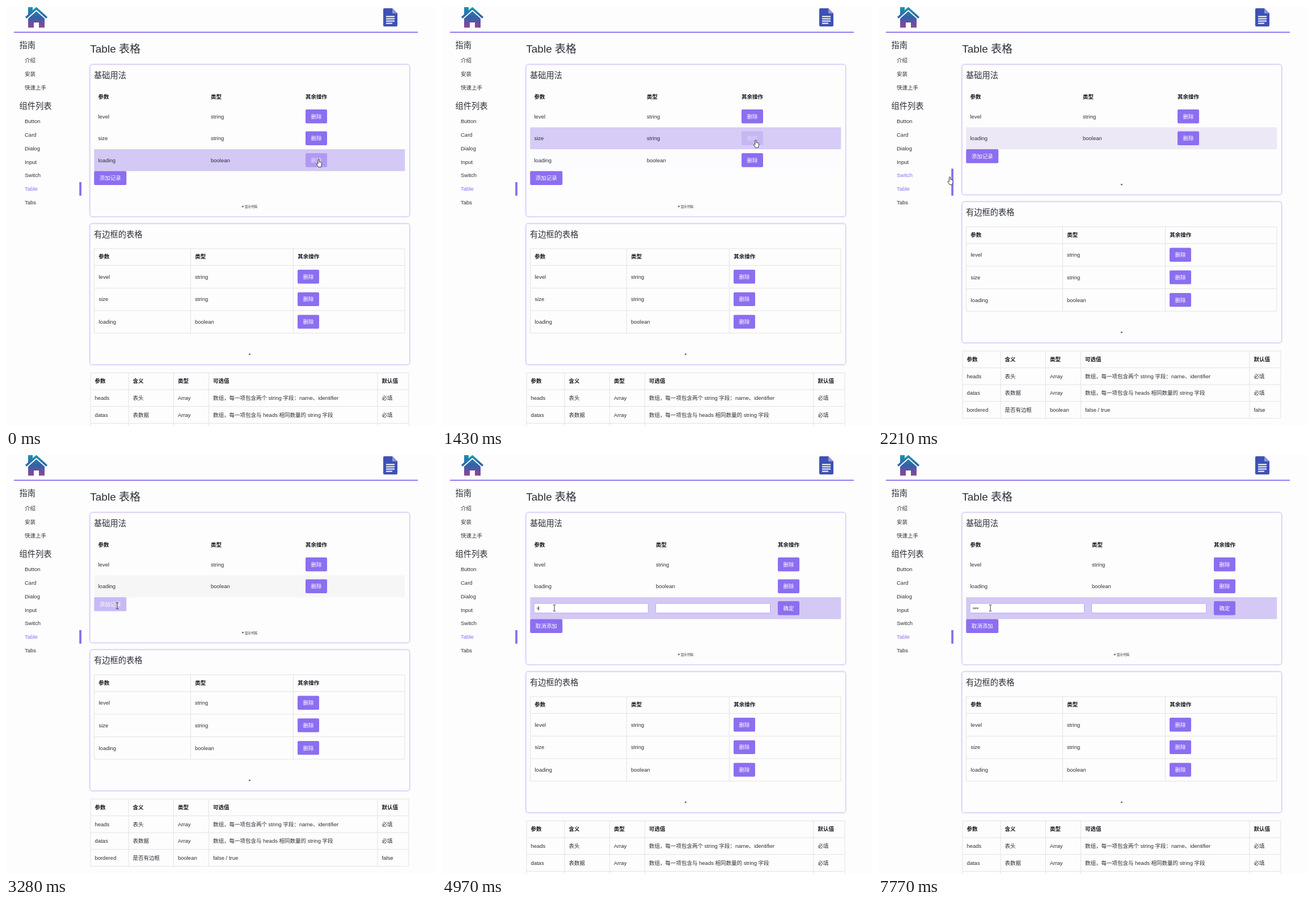
An HTML page that plays this animation: 758x739 px, repeating every 8000 ms.

```html
<!DOCTYPE html>
<html lang="zh-CN">
<head>
<meta charset="utf-8">
<style>
  html, body { margin: 0; width: 100%; height: 100%; overflow: hidden; background: #fdfdfd; }
  svg { display: block; font-family: "Liberation Sans", "Noto Sans CJK SC", "Noto Sans CJK", sans-serif; }
  text { white-space: pre; }
  .card { fill: #fdfdfd; filter: drop-shadow(0 0 1.6px #8c6ef0); }
</style>
</head>
<body>
<svg id="stage" width="758" height="739" viewBox="0 0 758 739"></svg>
<script>
const PURPLE = '#8c6ef0', INK = '#2c3038', HOVER = '#d4c8f5', GRID = '#e3e3e6';
const LOOP = 8000, BASE = 9.5, ROW = 38.5;

// Each step overrides part of the state from its time on.
const steps = [
  [0, { rows: ['level', 'size', 'loading'], shade: ['', '', HOVER], press: [2, .5], cursor: ['hand', 547, 269],
        adding: false, addAlpha: 1, code: true, menu: false, typed: '', caret: null }],
  [500, { cursor: ['hand', 548, 270] }],
  [930, { cursor: ['hand', 549, 247], shade: ['', '#f7f6fb', '#d6ccf7'], press: [1, .8] }],
  [1050, { cursor: ['hand', 549, 242], shade: ['', '#eae8f5', '#dfd9f9'], press: [1, .6] }],
  [1170, { shade: ['', '#ddd6f6', '#eeebfb'], press: [1, .5] }],
  [1290, { shade: ['', '#d6ccf6', '#fcfbfe'] }],
  [1430, { cursor: ['hand', 549, 235], press: [1, .22] }],
  [1550, { rows: ['level', 'loading'], shade: ['', HOVER], press: [-1, 1] }],
  [2060, { cursor: ['arrow', 486, 244] }],
  [2210, { cursor: ['hand', 122.5, 300], shade: ['', '#ece8f6'], code: false, menu: true }],
  [2360, { cursor: ['hand', 127, 300] }],
  [2500, { cursor: ['arrow', 489, 300], code: true, menu: false }],
  [2620, { cursor: ['arrow', 356, 311] }],
  [2760, { cursor: ['arrow', 332, 283] }],
  [2900, { cursor: ['arrow', 216, 283] }],
  [3040, { cursor: ['hand', 195, 264], shade: ['', '#f6f6f6'], addAlpha: .7 }],
  [3160, { addAlpha: .6 }],
  [3280, { cursor: ['beam', 193.5, 261], addAlpha: .47 }],
  [3400, { cursor: ['beam', 195.5, 265], adding: true, addAlpha: 1, shade: ['', '', '#e6e0f8'], caret: 167 }],
  [3520, { shade: ['', '', HOVER] }],
  [3920, { caret: null }],
  [4430, { caret: 167 }],
  [4970, { typed: 's', caret: 170 }],
  [5090, { typed: 'si', caret: 171 }],
  [5630, { caret: null }],
  [6200, { caret: 171 }],
  [6350, { typed: 'siz', caret: 174 }],
  [6730, { typed: 'size', caret: 177 }],
  [7240, { caret: 382 }],
  [7770, { caret: null }]
];
const types = { level: 'string', size: 'string', loading: 'boolean' };

const rect = (x, y, w, h, fill, attrs = '') =>
  `<rect x="${x}" y="${y}" width="${w}" height="${h}" fill="${fill}" ${attrs}/>`;
const path = (d, fill, attrs = '') => `<path d="${d}" fill="${fill}" ${attrs}/>`;
// y is the optical middle of the line
const text = (x, y, s, size = BASE, fill = INK, weight = 400) =>
  `<text x="${x}" y="${y + size * .36}" font-size="${size}" fill="${fill}" font-weight="${weight}">${s}</text>`;
const bold = (x, y, s) => text(x, y, s, BASE, '#15181f', 700);
const button = (x, y, label, alpha = 1) =>
  `<g opacity="${alpha}">${rect(x, y - 12.2, label.length * BASE + 19, 24.4, PURPLE, 'rx="2"')}${text(x + 9.5, y, label, BASE, '#fff')}</g>`;
const card = (y, h, title) =>
  `<rect class="card" x="148.5" y="${y}" width="562.5" height="${h}" rx="4"/>${text(155, y + 18, title, 14.25)}`;
const triangle = (x, y) => path(`M${x - 2} ${y - 1.3}h4l-2 2.8z`, '#444');

function grid(xs, ys) {
  const [left, right, top, bottom] = [xs[0], xs.at(-1), ys[0], ys.at(-1)];
  const d = xs.map(x => `M${x} ${top}V${bottom}`).join('') + ys.map(y => `M${left} ${y}H${right}`).join('');
  return path(d, 'none', `stroke="${GRID}"`);
}

function cursor([kind, x, y]) {
  const shape = {
    hand: path('M3 8.5V1.7a1.1 1.1 0 0 1 2.2 0V5.2l3 .7q1.3.4 1.3 1.8v2.8L8.3 14.4H3.8L.9 10q-.8-1.7.5-2Z',
      '#fff', 'stroke="#222" stroke-width=".9" stroke-linejoin="round"'),
    arrow: path('M.4.5V10l2.1-1.9 1.4 3.4 1.4-.6L3.9 7.6h2.9Z', '#fff', 'stroke="#222" stroke-width=".7"'),
    beam: path('M.3.5H2l.6.5.6-.5h1.7M2.6.8v10.4M.3 11.5H2l.6-.5.6.5h1.7', 'none', 'stroke="#222" stroke-width=".9"')
  };
  return `<g transform="translate(${x} ${y})">${shape[kind]}</g>`;
}

function header() {
  return `<defs><linearGradient id="house" gradientUnits="userSpaceOnUse" x1="0" y1="1" x2="0" y2="38">
      <stop offset="0" stop-color="#1697b4"/><stop offset=".5" stop-color="#3162a6"/><stop offset="1" stop-color="#92439b"/>
    </linearGradient></defs>` +
    path('M39 2h8v5.5l6.5-5.7L73 19.2 70.7 22 53.5 6.8 36.3 22 34 19.2l5-4.4Z', 'url(#house)') +
    path('M39 22 53.5 9.3 68 22V38H58V29H49V38H39Z', 'url(#house)') +
    path('M667 4h14l9 9v21q0 2-2 2h-21q-2 0-2-2V6q0-2 2-2Z', '#3f51b5') +
    path('M681 4l9 9h-9Z', '#8d98d6') +
    path('M670 18.5h15M670 22.5h15M670 26.5h15M670 30.5h11', 'none', 'stroke="#fff" stroke-width="1.8"') +
    rect(14, 45.3, 712, 1.9, PURPLE);
}

function sidebar(s) {
  const guide = ['介绍', '安装', '快速上手'];
  const parts = ['Button', 'Card', 'Dialog', 'Input', 'Switch', 'Table', 'Tabs'];
  const active = name => name === 'Table' || (s.menu && name === 'Switch');
  return text(23.5, 69, '指南', 14.25) + guide.map((g, i) => text(33, 96 + i * 23.8, g)).join('') +
    text(23.5, 175.5, '组件列表', 14.25) +
    parts.map((p, i) => {
      const y = 203 + i * 23.75;
      return text(33, y, p, BASE, active(p) ? PURPLE : INK) +
        (active(p) ? rect(129.2, y - 11.8, 3.8, 23.8, PURPLE) : '');
    }).join('');
}

function basicCard(s, shift) {
  const [typeX, actionX] = s.adding ? [377, 592] : [361, 528];
  const labelY = 353 - shift;
  let out = card(103.5, 266.5 - shift, '基础用法') +
    bold(162.5, 160, '参数') + bold(typeX, 160, '类型') + bold(actionX, 160, '其余操作');
  s.shade.forEach((c, i) => { if (c) out += rect(155.3, 175 + i * ROW, 548, ROW, c); });
  s.rows.forEach((name, i) => {
    const y = 194.2 + i * ROW;
    out += text(162.5, y, name) + text(typeX, y, types[name]) +
      button(actionX, y, '删除', s.press[0] === i ? s.press[1] : 1);
  });
  if (s.adding) {
    const field = 'rx="2" stroke="#b5a3f4" stroke-width=".9"';
    out += rect(162, 263, 201.5, 16.8, '#fff', field) + rect(376.7, 263, 202, 16.8, '#fff', field) +
      text(167, 271.4, s.typed, 5.7, '#111') + button(592, 271.2, '确定');
    if (s.caret) out += rect(s.caret, 268, 1, 7, '#222');
  }
  out += button(155.3, 302.8 - shift, s.adding ? '取消添加' : '添加记录', s.addAlpha);
  return out + (s.code
    ? triangle(417.5, labelY) + text(420.7, labelY, '显示代码', 5.6, '#222')
    : triangle(429.5, labelY));
}

function borderedCard() {
  const xs = [155.5, 325.5, 506.5, 703];
  return card(383.5, 247, '有边框的表格') + grid(xs, [427, 456.5, 496.3, 536, 575.5]) +
    ['参数', '类型', '其余操作'].map((h, i) => bold(xs[i] + 7.8, 441, h)).join('') +
    Object.keys(types).map((name, i) => {
      const y = 476.2 + i * 39.7;
      return text(163.5, y, name) + text(333, y, types[name]) + button(514, y, '删除');
    }).join('') + triangle(429.5, 613);
}

function apiTable() {
  const xs = [149, 216, 295.5, 357.5, 655, 710];
  const lines = [
    ['参数', '含义', '类型', '可选值', '默认值'],
    ['heads', '表头', 'Array', '数组，每一项包含两个 string 字段：name、identifier', '必填'],
    ['datas', '表数据', 'Array', '数组，每一项包含与 heads 相同数量的 string 字段', '必填'],
    ['bordered', '是否有边框', 'boolean', 'false / true', 'false']
  ];
  return grid(xs, [0, 1, 2, 3, 4].map(i => 645.5 + i * 29.6)) +
    lines.map((line, r) => line.map((cell, c) =>
      (r ? text : bold)(xs[c] + 7.4, 660 + r * 29.7, cell)).join('')).join('');
}

function scene(s) {
  const shift = s.rows.length + s.adding < 3 ? ROW : 0;
  return header() + sidebar(s) + text(148.3, 75, 'Table 表格', 19) + basicCard(s, shift) +
    `<g transform="translate(0 ${-shift})">${borderedCard()}${apiTable()}</g>` + cursor(s.cursor);
}

const stage = document.getElementById('stage');
let shown = -1;
function tick() {
  const t = performance.now() % LOOP;
  const count = steps.filter(([start]) => start <= t).length;
  if (count !== shown) {
    shown = count;
    stage.innerHTML = scene(Object.assign({}, ...steps.slice(0, count).map(step => step[1])));
  }
  requestAnimationFrame(tick);
}
tick();
</script>
</body>
</html>
```
